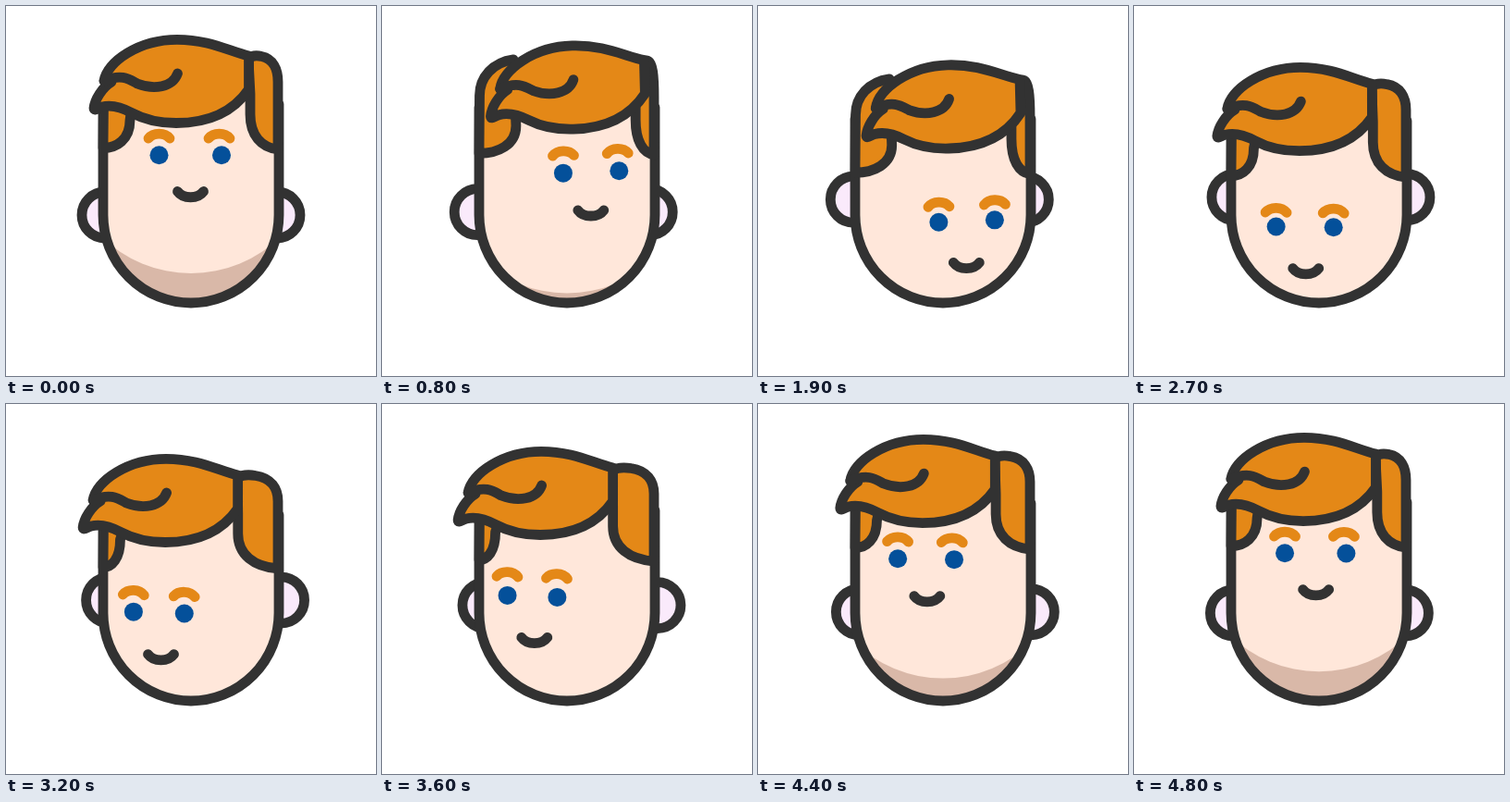
Animation of 400 by 400 pixels, one loop 4900 ms. Source, as an HTML page with a canvas:

```html
<!DOCTYPE html>
<html lang="en">
<head>
<meta charset="utf-8">
<title>Head turn</title>
<style>
html, body { margin: 0; width: 100%; height: 100%; overflow: hidden; background: #fff; }
canvas { display: block; width: 400px; height: 400px; }
</style>
</head>
<body>
<canvas id="stage"></canvas>
<script>
const LOOP = 4900, STEP = 100, TURN = 4880;
const INK = '#323232', HAIR = '#e48817', SKIN = '#ffe7da', SHADE = '#d9b8a8';
const BROW = '#e48817', EYE = '#04509a', EAR = '#faeafb';

const canvas = document.getElementById('stage');
const ctx = canvas.getContext('2d');
const ratio = window.devicePixelRatio || 1;
canvas.width = canvas.height = 400 * ratio;

const QUIFF = new Path2D(
  'M106 81 C109 60 144 36.3 185 36.3 C220 36.3 240 48.5 262.5 54 L262.5 90 ' +
  'C246 114 220 126.5 184 126.5 C162 126.5 148 122 136 115.5 ' +
  'C124 109 114 106.5 104 109 C99 110.5 95 114 95 110.5 C96 101 104 88 114 82 Z');
const LOCK = new Path2D('M106 81 C125 73 133 79 142 84 C160 91 180 88 185.5 73');
const BROW_ARC = new Path2D('M-11.5 2.4 C-6 -4.2 6 -4.2 11.5 2.4');
const SMILE = new Path2D('M-14 -3.3 C-8 5 8 5 14 -3.3');

function paint(path, fill, line) {
  if (fill) { ctx.fillStyle = fill; ctx.fill(path); }
  if (line) { ctx.strokeStyle = line; ctx.stroke(path); }
}

function at(x, y, angle, draw) {
  ctx.save();
  ctx.translate(x, y);
  ctx.rotate(angle * Math.PI / 180);
  draw();
  ctx.restore();
}

function disc(x, y, r) {
  const p = new Path2D();
  p.arc(x, y, r, 0, Math.PI * 2);
  return p;
}

// How far the head looks right, left, up and down, each 0 to 1
function look(t) {
  const a = t / TURN * Math.PI * 2;
  const b = a - 0.21 * Math.sin(a);
  const x = Math.sin(b), y = Math.cos(b);
  return { x, r: Math.max(x, 0), l: Math.max(-x, 0), u: Math.max(y, 0), d: Math.max(-y, 0) };
}

function jaw(top) {
  const p = new Path2D();
  p.moveTo(295, top);
  p.lineTo(295, 226);
  p.arc(200, 226, 95, 0, Math.PI);
  p.lineTo(105, top);
  return p;
}

function drawHead(k, dy) {
  const earX = -5 * k.x, earY = 216.3 + 9.7 * k.u - 10.5 * k.d;
  for (const x of [107, 293]) paint(disc(x + earX, earY, 25), EAR, INK);

  const face = jaw(90 + dy * 0.6);
  ctx.save();
  ctx.clip(face);
  paint(face, SHADE);
  paint(disc(200, 151 + 63 * (1 - k.u), 138), SKIN);
  ctx.restore();
  paint(jaw(106 + dy * 0.6), null, INK);
}

function drawSides(k, dy) {
  // left side
  const lx = 134 + 14.5 * k.r - 11.5 * k.l, lb = 153.5 + dy;
  const lt = 51 + dy + 12 * (1 - Math.min(1, k.r * 1.35));
  paint(new Path2D(
    `M105 ${lb} L105.5 ${lt + 40} C105.5 ${lt + 20} 120 ${lt + 4} 142 ${lt + 1} ` +
    `L${lx} ${lb - 30} C${lx} ${lb - 9} ${(lx + 105) / 2} ${lb} 105 ${lb} Z`), HAIR, INK);

  // right side
  const tx = 262 + 28.3 * k.r - 13 * k.l, ty = 57 + dy - k.r;
  const bx = 264 + 13.5 * k.r - 14.5 * k.l, by = 155 + dy;
  const edge = 294, w = edge - tx;
  paint(new Path2D(
    `M${tx} ${ty} C${tx + w * 0.13} ${ty - 4} ${tx + w * 0.32} ${ty - 3.5} ${tx + w * 0.45} ${ty - 2.5} ` +
    `C${tx + w * 0.83} ${ty} ${edge} ${ty + 11} ${edge} ${ty + 25 + 16 * k.r} ` +
    `L${edge} ${by} C${bx + (edge - bx) * 0.4} ${by - 2} ${bx} ${by - 15} ${bx} ${by - 38} ` +
    `L${bx} ${by - 60} Z`), HAIR, INK);
}

function drawQuiff(k, dy) {
  const dx = 28.8 * k.r - 13 * k.l;
  at(185 + dx, 80 + dy + k.r, -2 * k.r, () => {
    ctx.translate(-185, -80);
    paint(QUIFF, HAIR, INK);
    paint(LOCK, null, INK);
  });
}

function drawFeatures(k) {
  const eyeY = 215 - 53.8 * k.u + 26 * k.d;
  const tilt = 1.6 * k.r - k.l;
  const eyes = [
    [165.5 + 40.5 * k.r - 30.2 * k.l, eyeY + tilt, 0],
    [233 + 31 * k.r - 44 * k.l, eyeY - tilt, -2.5 * k.u]
  ];
  const lift = 23 - 2.5 * k.u - 5.8 * k.d;
  for (const [x, y, shift] of eyes) {
    paint(disc(x, y, 10), EYE);
    at(x + shift, y - lift, -2 * k.x, () => paint(BROW_ARC, null, BROW));
  }
  at(199.5 + 35 * k.x, 263.5 - 59.7 * k.u + 25.5 * k.d, 0, () => paint(SMILE, null, INK));
}

function draw(t) {
  const k = look(t);
  const dy = 17.3 * (1 - k.u) + 14 * k.d;
  ctx.setTransform(ratio, 0, 0, ratio, 0, 0);
  ctx.fillStyle = '#fff';
  ctx.fillRect(0, 0, 400, 400);
  ctx.lineWidth = 10.8;
  ctx.lineCap = ctx.lineJoin = 'round';
  drawHead(k, dy);
  drawSides(k, dy);
  drawQuiff(k, dy);
  drawFeatures(k);
}

let start = null;
function tick(now) {
  if (start === null) start = now;
  draw(Math.floor((now - start) % LOOP / STEP) * STEP);
  requestAnimationFrame(tick);
}
draw(0);
requestAnimationFrame(tick);
</script>
</body>
</html>
```
